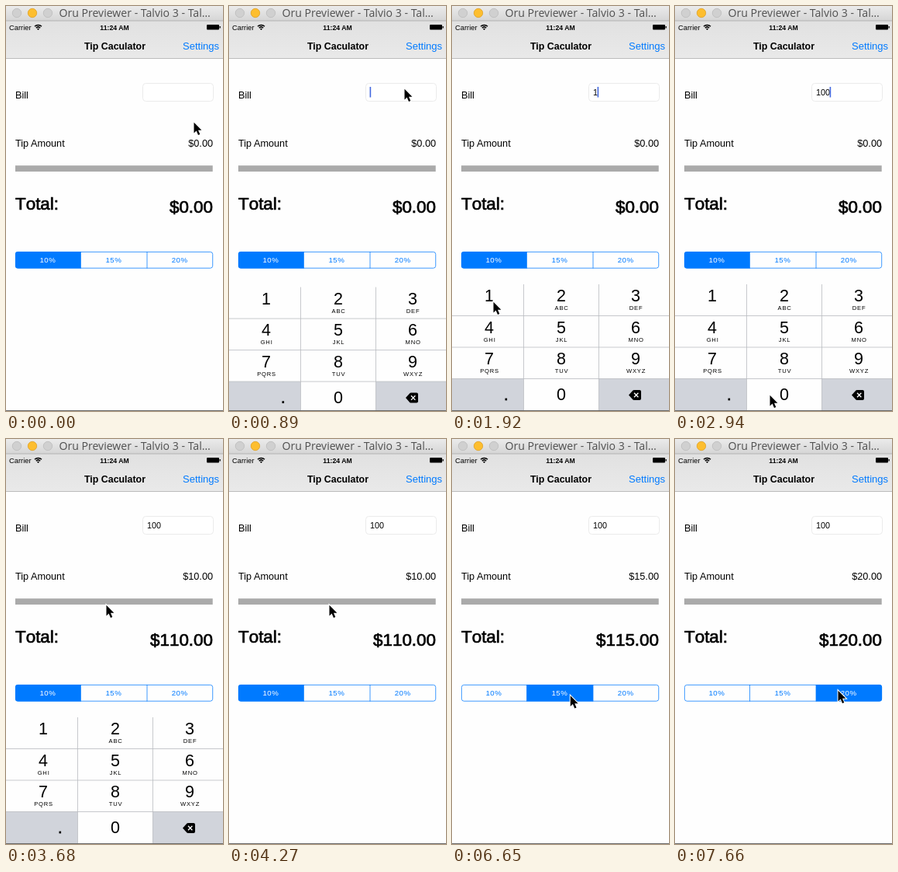
An HTML page for the animation above (8 s loop, 280 by 521 pixels).

```html
<!DOCTYPE html>
<html lang="en">
<head>
<meta charset="utf-8">
<title>Tip calculator</title>
<style>
  html, body { margin: 0; width: 100%; height: 100%; overflow: hidden; background: #fefefe; }
  svg { display: block; width: 280px; height: 521px; }
  text { font-family: "Liberation Sans", Arial, sans-serif; font-size: 12.7px; fill: #000; }
  .window { font: 14.1px "Open Sans", "Noto Sans", sans-serif; fill: #505050; }
  .status { font-size: 9.4px; }
  .clock { font-size: 8.7px; font-weight: bold; }
  .heading { font-size: 12.4px; font-weight: bold; }
  .link { font-size: 13px; fill: #007aff; }
  .big { font-size: 22.4px; font-kerning: none; stroke: #000; stroke-width: .7px; }
  .input { font-size: 10.8px; }
  .end { text-anchor: end; }
  .mid, .digit, .letters, .seg text { text-anchor: middle; }
  .seg text { font-size: 9.7px; letter-spacing: .45px; fill: #007aff; }
  .seg rect { fill: #fefefe; }
  .seg.lit rect { fill: #d8ebff; }
  .seg.on rect { fill: #007aff; }
  .seg.on text { fill: #fff; }
  .digit { font-size: 21.5px; }
  .letters { font-size: 7.6px; letter-spacing: .8px; }
  .line { stroke: #b9bcc1; stroke-width: .8; }
</style>
</head>
<body>
<svg viewBox="0 0 280 521">
  <defs>
    <linearGradient id="chrome" x2="0" y2="1">
      <stop offset="0" stop-color="#ebebeb"/><stop offset="1" stop-color="#d5d5d5"/>
    </linearGradient>
    <linearGradient id="nav" x2="0" y2="1">
      <stop offset="0" stop-color="#e1e1e1"/><stop offset="1" stop-color="#e9e9e9"/>
    </linearGradient>
    <clipPath id="pill"><rect x="12" y="316" width="255" height="21.5" rx="3"/></clipPath>
  </defs>

  <rect width="280" height="521" fill="#fefefe"/>
  <rect y="19" width="280" height="48" fill="url(#nav)"/>
  <rect y="67" width="280" height="1" fill="#bcbcbc"/>
  <rect width="280" height="19" fill="url(#chrome)"/>
  <rect y="18.5" width="280" height="1" fill="#b4b4b4"/>
  <g fill="#d0d0d0" stroke="#bcbcbc" stroke-width=".8">
    <circle cx="14" cy="9" r="5.7"/>
    <circle cx="34" cy="9" r="5.7" fill="#fdbe2f" stroke="#dfa023"/>
    <circle cx="54" cy="9" r="5.7"/>
  </g>
  <text class="window" x="68.5" y="14">Oru Previewer - Talvio 3 - Tal…</text>

  <text class="status" x="4" y="30.7">Carrier</text>
  <g fill="none" stroke="#000" stroke-width="1.5">
    <path d="M37 26.3a6.4 6.4 0 0 1 9 0M38.8 28.2a3.9 3.9 0 0 1 5.4 0"/>
    <path d="M41.5 31l-1.5-1.6a2.2 2.2 0 0 1 3 0z" fill="#000" stroke="none"/>
  </g>
  <text class="clock mid" x="140" y="31">11:24 AM</text>
  <rect x="259" y="24" width="16" height="6.5" rx="1"/>
  <rect x="275.5" y="26" width="1.3" height="2.5"/>
  <text class="heading mid" x="140.5" y="56">Tip Caculator</text>
  <text class="link end" x="275" y="56">Settings</text>

  <text x="12" y="118.7">Bill</text>
  <rect x="176.5" y="99.5" width="91" height="23" rx="4" fill="#fff" stroke="#ebebeb"/>
  <text id="bill" class="input" x="182" y="115"></text>
  <rect id="caret" y="104" width="1.6" height="13.5" fill="#4368df"/>
  <text x="12" y="180.5">Tip Amount</text>
  <text id="tip" class="end" x="267" y="180.5"></text>
  <rect x="12" y="205.2" width="254.7" height="7.8" fill="#aaa"/>
  <text class="big" x="12" y="262.3">Total:</text>
  <text id="total" class="big end" x="267" y="265.7"></text>

  <g id="rates" clip-path="url(#pill)"></g>
  <g fill="none" stroke="#007aff" stroke-width=".75">
    <rect x="12.4" y="316.4" width="254.3" height="20.8" rx="3"/>
    <path d="M96.5 316v21.500M182 316v21.500"/>
  </g>

  <g id="pad"></g>
  <rect y="520" width="280" height="1" fill="#6a6a6a"/>
  <path id="pointer" d="M.5 .8v13.7l3.100-2.900 2.400 5.400 2.300-1-2.300-5.200h4.400z"
    stroke="#fff" stroke-width="2" paint-order="stroke"/>
</svg>

<script>
const LOOP = 8000, STEP = 147.2, PAD_HEIGHT = 163;
const $ = id => document.getElementById(id);

// Rate selector
const edges = [12, 96.5, 182, 267], rates = [10, 15, 20];
$('rates').innerHTML = rates.map((rate, i) => {
  const x = edges[i], w = edges[i + 1] - x;
  return `<g class="seg"><rect x="${x}" y="316" width="${w}" height="22"/>
    <text x="${x + w / 2 - .4}" y="330">${rate}%</text></g>`;
}).join('');
const segs = [...$('rates').children];

// Number pad
const cols = [0, 92.5, 189.5, 280], mids = [48, 141, 237];
const rowTop = r => 358 + r * 40.5;
const letters = ['', 'ABC', 'DEF', 'GHI', 'JKL', 'MNO', 'PQRS', 'TUV', 'WXYZ'];
const keyBox = (c, r, fill, id = '') =>
  `<rect id="${id}" x="${cols[c]}" y="${rowTop(r)}" width="${cols[c + 1] - cols[c]}" height="40.6" fill="${fill}"/>`;
const digit = (c, y, s) => `<text class="digit" x="${mids[c]}" y="${y}">${s}</text>`;

let pad = letters.map((s, i) => {
  const c = i % 3, r = Math.floor(i / 3), y = rowTop(r);
  return keyBox(c, r, '#fefefe', 'key' + (i + 1)) + digit(c, y + 22.2, i + 1) +
    `<text class="letters" x="${mids[c] + .6}" y="${y + 33.2}">${s}</text>`;
}).join('');
pad += keyBox(0, 3, '#d1d4db') + keyBox(1, 3, '#fefefe', 'key0') + keyBox(2, 3, '#d1d4db');
pad += digit(1, 507.3, 0) + '<rect x="68.5" y="504.6" width="2.6" height="2.8"/>';
pad += `<path class="line" d="M92.5 358v162M189.5 358v162${[1, 2, 3].map(r => `M0 ${rowTop(r)}h280`).join('')}"/>`;
pad += `<path d="M228 500.5l5-5.6q.7-.9 2-.9h7q2 0 2 2v9q0 2-2 2h-7q-1.3 0-2-.9z"/>
  <path d="M235 497.7l5.4 5.6m0-5.6l-5.4 5.6" stroke="#fff" stroke-width="1.3"/>`;
$('pad').innerHTML = pad;

// Pointer stops: step, x, y
const path = [
  [0, 242, 149], [3, 227, 107], [6, 226, 106], [8, 160, 215], [10, 58, 374],
  [12, 53, 380], [13, 53, 380], [16, 122, 500], [21, 122, 500], [24, 130, 224],
  [25, 129, 213], [31, 129, 213], [35, 140, 331], [36, 138, 331],
  [43, 138, 331], [50, 210, 323], [60, 210, 323]
];
function pointerAt(n) {
  const i = path.findIndex(p => p[0] > n);
  const [n0, x0, y0] = path[i - 1], [n1, x1, y1] = path[i];
  const u = (n - n0) / (n1 - n0), k = u * u * (3 - 2 * u);
  return [x0 + (x1 - x0) * k, y0 + (y1 - y0) * k];
}

// Critically damped slide: 1 at the start, 0 when settled
function settle(steps) {
  const w = 19.4 * Math.max(0, steps) * STEP / 1000;
  return (1 + w) * Math.exp(-w);
}

const money = v => '$' + v.toFixed(2);
const within = (n, a, b) => n >= a && n <= b;

function draw(n) {
  const bill = n < 13 ? '' : n < 18 ? '1' : n < 20 ? '10' : '100';
  $('bill').textContent = bill;
  $('caret').setAttribute('x', 181.6 + 6 * bill.length);
  const caretOn = within(n, 4, 22) && !within(n, 8, 10);
  $('caret').style.display = caretOn ? '' : 'none';

  const rate = n < 39 ? 10 : n < 51 ? 15 : 20;
  const base = n < 25 ? 0 : 100;
  $('tip').textContent = money(base * rate / 100);
  $('total').textContent = money(base * (100 + rate) / 100);

  const on = n < 40 ? 0 : n < 52 ? 1 : 2;
  const lit = within(n, 38, 39) ? 1 : within(n, 50, 51) ? 2 : -1;
  segs.forEach((s, i) =>
    s.setAttribute('class', 'seg' + (i === on ? ' on' : i === lit ? ' lit' : '')));

  const hidden = n < 25 ? settle(n - 4) : n >= 29 ? 1 : 1 - settle(n - 25.5);
  $('pad').setAttribute('transform', `translate(0 ${(hidden * PAD_HEIGHT).toFixed(2)})`);
  $('pad').style.display = hidden > .999 ? 'none' : '';
  $('key1').setAttribute('fill', n === 12 ? '#d1d4db' : '#fefefe');
  $('key0').setAttribute('fill', n === 17 || n === 19 ? '#d1d4db' : '#fefefe');

  $('pointer').setAttribute('transform', `translate(${pointerAt(n).join(' ')})`);
}

const start = performance.now();
function tick() {
  const t = (performance.now() - start) % LOOP;
  draw(Math.floor((t + 6) / STEP));
  requestAnimationFrame(tick);
}
tick();
</script>
</body>
</html>
```
